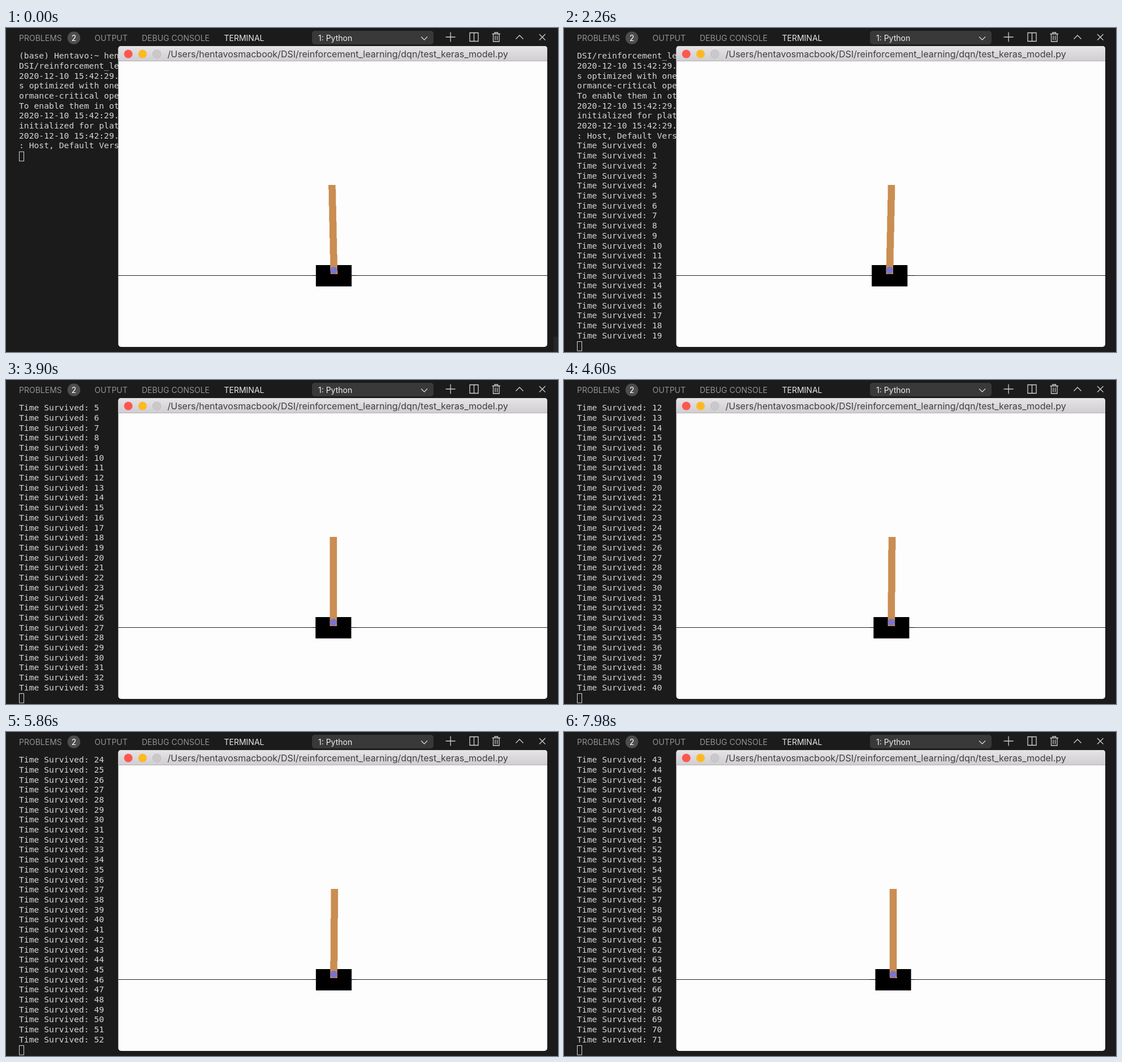
Animation, 976 px wide and 574 px high, one loop 8 s. Source, as an HTML page:

```html
<!DOCTYPE html>
<html lang="en">
<head>
<meta charset="utf-8">
<title>Pole balancing</title>
<style>
  html, body { margin: 0; width: 100%; height: 100%; overflow: hidden; background: #1b1b1b; }
  #log {
    position: absolute; left: 23px; top: 40.15px; margin: 0;
    font: 14.7px/17.7px "DejaVu Sans Mono", monospace; color: #d6d6d6;
  }
  svg { position: absolute; left: 0; top: 0; font: 14px Inter, sans-serif; }
  .tab { fill: #929292; }
  .icon { fill: none; stroke: #d0d0d0; stroke-width: 1.3; }
</style>
</head>
<body>
<pre id="log"></pre>
<svg width="976" height="574" viewBox="0 0 976 574">
  <defs>
    <linearGradient id="bar" x2="0" y2="1">
      <stop offset="0" stop-color="#e6e4e6"/>
      <stop offset="1" stop-color="#cfcdcf"/>
    </linearGradient>
  </defs>

  <g class="tab">
    <text x="23" y="23">PROBLEMS</text>
    <text x="156.5" y="23">OUTPUT</text>
    <text x="240" y="23">DEBUG CONSOLE</text>
    <text x="385.5" y="23" fill="#e8e8e8">TERMINAL</text>
  </g>
  <circle cx="120" cy="17.5" r="11.3" fill="#4d4d4d"/>
  <text x="120" y="22.5" text-anchor="middle" fill="#fff">2</text>
  <rect x="541" y="5" width="215" height="24" rx="5" fill="#393939"/>
  <text x="552" y="23" fill="#f0f0f0">1: Python</text>
  <g class="icon">
    <path d="M734 15.5l5.5 5.5 5.5-5.5"/>
    <path d="M777.5 16h17M786 7.5v17"/>
    <path d="M820 8.5h15v15h-15zM827.5 8.5v15"/>
    <path d="M859.5 10.5h14.5M864 10.5v-2.5h5.500v2.500M861.500 10.500v13.500h10.500v-13.500M865 13.500v8M868.500 13.500v8"/>
    <path d="M901.500 19.500l6.500-6.500 6.500 6.500"/>
    <path d="M943 11l10.500 10.500M953.500 11l-10.500 10.500"/>
  </g>
  <rect id="scrollbar" x="968" y="547" width="8" height="27" fill="#262626"/>
  <rect id="cursor" x="23.5" width="8" height="16.5" fill="none" stroke="#d6d6d6"/>

  <rect x="198.500" y="32" width="758.500" height="533" rx="5" fill="#fdfdfd"/>
  <path d="M198.500 59V37q0-5 5-5H952q5 0 5 5V59z" fill="url(#bar)"/>
  <path d="M198.500 58.500H957" stroke="#b4b2b4"/>
  <circle cx="216.200" cy="46" r="7.600" fill="#fc5753"/>
  <circle cx="241.400" cy="46" r="7.600" fill="#fdb924"/>
  <circle cx="266.600" cy="46" r="7.300" fill="#cac8ca" stroke="#b7b5b7" stroke-width=".7"/>
  <text x="285.500" y="52" font-size="16" fill="#3f3f3f">/Users/hentavosmacbook/DSI/reinforcement_learning/dqn/test_keras_model.py</text>

  <rect id="cart" y="420" width="63.200" height="37.800"/>
  <path id="pole" fill="#ca8d52"/>
  <circle id="axle" cy="429.300" r="6.300" fill="#7b74cb"/>
  <path d="M198.500 438.500H548M611 438.500H957" stroke="#222"/>
  <path d="M540 438.500H620" stroke="#000"/>
</svg>
<script>
  const LOOP = 8000, ROWS = 30, LINE = 17.7;
  const GRID = 0.632;      // screen size of one rendered pixel
  const CENTER = 579.5, AXLE_Y = 429;
  const intro = [
    '(base) Hentavo:~ hen',
    'DSI/reinforcement_le',
    '2020-12-10 15:42:29.',
    's optimized with one',
    'ormance-critical ope',
    'To enable them in ot',
    '2020-12-10 15:42:29.',
    'initialized for plat',
    '2020-12-10 15:42:29.',
    ': Host, Default Vers'
  ];
  // step, cart offset in grid units, pole lean in grid units per pixel of height
  const poses = [
    [-1, 0.49, -0.0347],
    [19, -5.87, 0.0351],
    [27, -0.9, -0.005],
    [40, -1.207, 0.0133],
    [52, 0.2, 0.013],
    [60, 2.07, 0.0065],
    [71, 4.49, -0.002]
  ];

  const byId = id => document.getElementById(id);
  const setAttr = (id, name, value) => byId(id).setAttribute(name, value);
  const start = performance.now();
  let shown = null;

  // Pictures follow a repeating 20, 100, 20 ms rhythm.
  function tickAt(time) {
    const rest = time % 140;
    return Math.floor(time / 140) * 3 + (rest >= 20) + (rest >= 120);
  }

  const stepAt = tick => Math.max(-1, Math.floor((tick - 4.45) / 2.315));

  function poseAt(step) {
    const next = Math.max(1, poses.findIndex(pose => pose[0] >= step));
    const a = poses[next - 1], b = poses[next];
    const mix = (step - a[0]) / (b[0] - a[0]);
    return [1, 2].map(i => a[i] + (b[i] - a[i]) * mix);
  }

  function drawLog(step) {
    const lines = [...intro];
    for (let i = 0; i <= step; i++) lines.push('Time Survived: ' + i);
    const visible = lines.slice(Math.max(0, lines.length + 1 - ROWS));
    byId('log').textContent = visible.join('\n');
    setAttr('cursor', 'y', 42.2 + visible.length * LINE);
  }

  function drawCart(step) {
    const [offset, lean] = poseAt(step);
    const x = CENTER + Math.round(offset) * GRID;
    setAttr('cart', 'x', x - 31.6);
    setAttr('axle', 'cx', x);
    let path = '';
    for (let y = 278; y < 436; y++) {
      const left = CENTER - 6.3 + Math.round(offset + lean * (AXLE_Y - y)) * GRID;
      path += `M${left.toFixed(2)} ${y}h12.6v1h-12.6z`;
    }
    setAttr('pole', 'd', path);
  }

  function render(now) {
    const tick = tickAt(Math.max(0, now - start) % LOOP);
    const step = stepAt(tick);
    if (step !== shown) {
      shown = step;
      drawLog(step);
      drawCart(step);
    }
    setAttr('scrollbar', 'visibility', tick < 33 ? 'visible' : 'hidden');
    requestAnimationFrame(render);
  }

  render(start);
</script>
</body>
</html>
```
